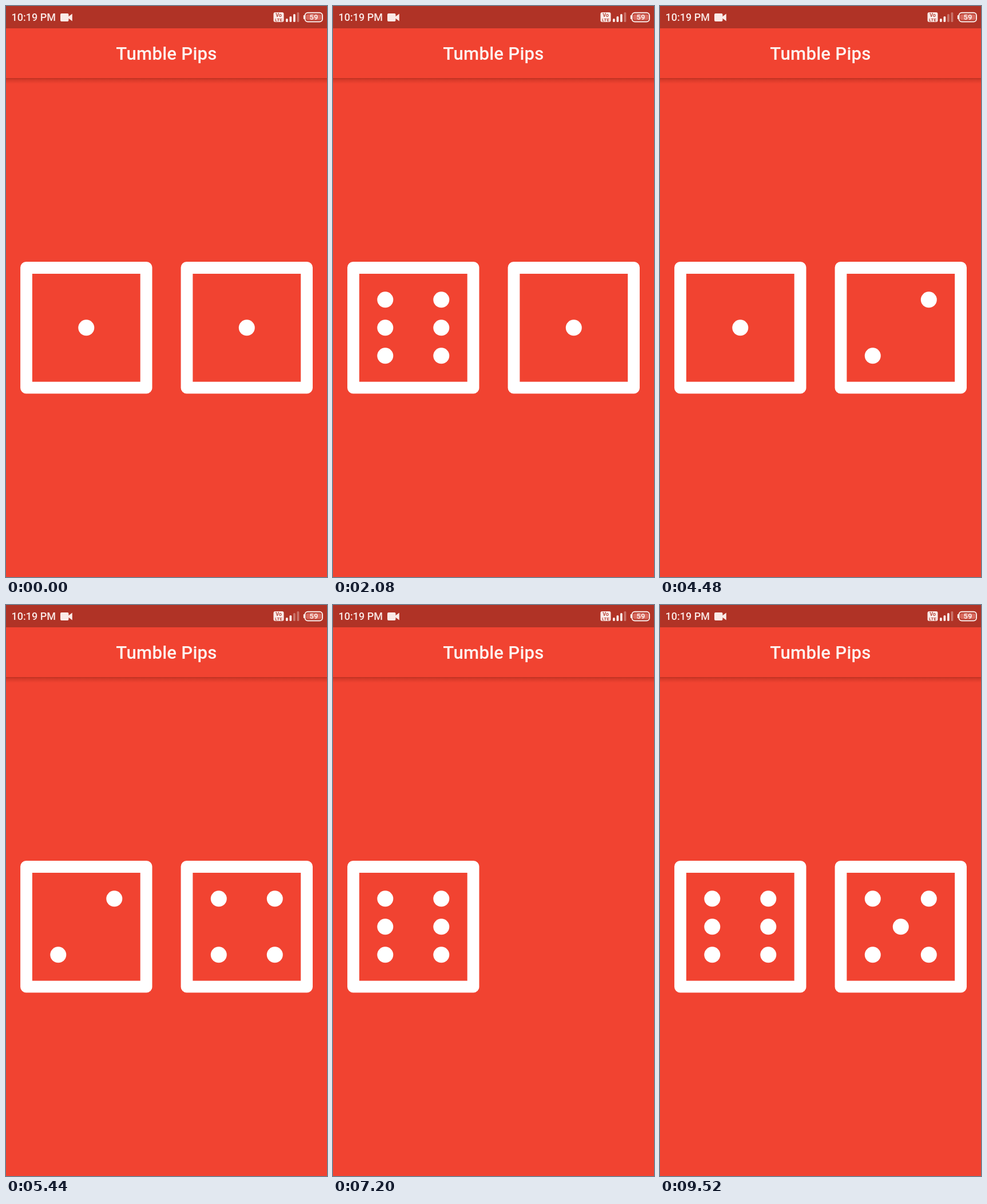
Recreate the animation shown at these times as an HTML page. Size 561x998 px, loop 9.6 s.

```html
<!DOCTYPE html>
<html lang="en">
<head>
<meta charset="utf-8">
<title>Tumble Pips</title>
<style>
  html, body { margin: 0; width: 100%; height: 100%; overflow: hidden; background: #f14331; }
  svg { display: block; width: 561px; height: 998px; }
  text { font-family: Roboto, sans-serif; font-weight: 500; }
  .status { fill: #faeae7; }
  .small { font-weight: 700; text-anchor: middle; }
</style>
</head>
<body>
<svg viewBox="0 0 561 998">
  <defs>
    <linearGradient id="shade" x2="0" y2="1">
      <stop offset="0" stop-color="#a82a1c" stop-opacity=".75"/>
      <stop offset=".3" stop-color="#b02c1e" stop-opacity=".4"/>
      <stop offset="1" stop-color="#b02c1e" stop-opacity="0"/>
    </linearGradient>
  </defs>
  <rect width="561" height="998" fill="#f14331"/>
  <rect width="561" height="39" fill="#b03326"/>
  <rect y="126" width="561" height="10" fill="url(#shade)"/>

  <g class="status">
    <text x="9.5" y="26.3" font-size="18">10:19 PM</text>
    <path d="M97 13h10.5a2 2 0 0 1 2 2v3.2l6.3-4.8v13.2l-6.3-4.8v3.2a2 2 0 0 1-2 2H97a2 2 0 0 1-2-2V15a2 2 0 0 1 2-2z"/>
    <rect x="467.5" y="11" width="18" height="17" rx="3"/>
    <g class="small" fill="#b03326">
      <text x="476.5" y="19" font-size="9">Vo</text>
      <text x="476.5" y="26.6" font-size="8">LTE</text>
    </g>
    <g id="bars"></g>
    <rect x="524.5" y="14.5" width="27" height="10" rx="3" fill="#d8695e"/>
    <rect x="522.5" y="11.8" width="30.5" height="15.6" rx="5" fill="none" stroke="#faeae7" stroke-width="2"/>
    <rect x="519.8" y="16" width="2.4" height="7" rx="1"/>
    <text class="small" x="538" y="24.2" font-size="13">59</text>
  </g>

  <text x="280.5" y="94.3" font-size="31.2" letter-spacing=".2" text-anchor="middle" fill="#fdf3f0">Tumble Pips</text>
  <g id="dice" fill="#fff"></g>
</svg>
<script>
  const LOOP = 9600;

  // [start ms, left face, right face]; 0 is a die not yet drawn
  const rolls = [
    [0, 1, 1], [480, 4, 2], [1520, 2, 4], [1920, 6, 1], [3040, 2, 6],
    [3600, 4, 6], [4480, 1, 2], [5200, 2, 4], [6560, 4, 1], [7200, 6, 0],
    [7280, 6, 3], [7840, 2, 6], [8400, 1, 4], [9440, 6, 5]
  ];

  // [column, row, test for the faces that show the pip]
  const pips = [
    [0, 0, n => n % 2 === 1],
    [1, -1, n => n > 1], [-1, 1, n => n > 1],
    [-1, -1, n => n > 3], [1, 1, n => n > 3],
    [-1, 0, n => n === 6], [1, 0, n => n === 6]
  ];

  function add(parent, tag, attrs) {
    const el = document.createElementNS('http://www.w3.org/2000/svg', tag);
    for (const key in attrs) el.setAttribute(key, attrs[key]);
    return parent.appendChild(el);
  }

  function makeDie(cx) {
    const die = add(document.getElementById('dice'), 'g', { transform: `translate(${cx} 562.3)` });
    add(die, 'path', {
      d: 'M-105.2-115.2h210.4a10 10 0 0 1 10 10v210.4a10 10 0 0 1-10 10h-210.4a10 10 0 0 1-10-10v-210.4a10 10 0 0 1 10-10zM-94.4-94.4v188.8h188.8v-188.8z',
      'fill-rule': 'evenodd'
    });
    const dots = pips.map(([x, y]) => add(die, 'circle', { cx: x * 49, cy: y * 49, r: 14 }));
    return face => {
      die.style.display = face ? '' : 'none';
      dots.forEach((dot, i) => { dot.style.display = pips[i][2](face) ? '' : 'none'; });
    };
  }

  const bars = [6, 10, 14, 17].map((h, i) => add(document.getElementById('bars'), 'rect', {
    x: 489 + i * 6.5, y: 28 - h, width: 3.8, height: h, rx: 1.6
  }));
  const showLeft = makeDie(140.3), showRight = makeDie(420.8);

  const start = performance.now();
  function draw() {
    const t = (performance.now() - start) % LOOP;
    const [, left, right] = rolls.findLast(roll => roll[0] <= t);
    showLeft(left);
    showRight(right);
    const level = t >= 3040 && t < 6560 ? 2 : 3;
    bars.forEach((bar, i) => bar.setAttribute('opacity', i < level ? 1 : 0.35));
    requestAnimationFrame(draw);
  }
  draw();
</script>
</body>
</html>
```
